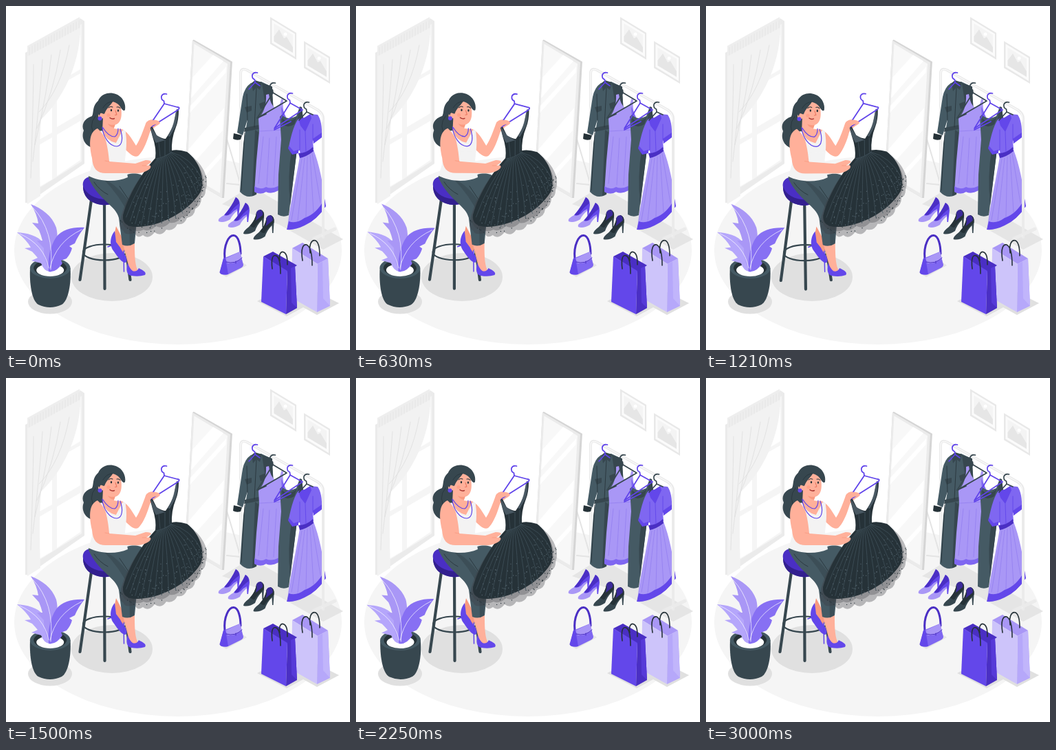
Recreate the animation shown at these times as an HTML page. Size 500 by 500 pixels, loop 3.04 s.

```html
<!DOCTYPE html>
<html lang="en">
<head>
<meta charset="utf-8">
<title>Choosing a dress</title>
<style>
html,body{margin:0;width:100%;height:100%;overflow:hidden;background:#fff}
svg{display:block;width:100vw;height:100vh}
.ln{fill:none;stroke-linecap:round;stroke-linejoin:round}
.skin{fill:#ffb09a}
.night{fill:#263238}.slate{fill:#37474f}.steel{fill:#455a64}
.deep{fill:#4a2fc4}.violet{fill:#6347ea}.mid{fill:#7f67f1}.lilac{fill:#a997f6}.pale{fill:#cdc4fa}
</style>
</head>
<body>
<svg viewBox="0 0 500 500">
<defs>
  <path id="hook" class="ln" d="M0,0L-.5,-4Q-5,-6 -4,-11Q-2,-15.500 3.500,-14"/>
  <g id="picture">
    <path fill="#e8e8e8" d="M0,0L38,23V62L0,39Z"/>
    <path fill="#fbfbfb" d="M2.500,4L36,24.500V58L2.500,37.500Z"/>
    <path fill="#f4f4f4" d="M5.500,9.500L33,26V52L5.500,35.500Z"/>
    <path fill="#e6e6e6" d="M5.500,35.500V28L13,18L20,31L24,29L33,44V52Z"/>
    <circle cx="22" cy="25" r="2.500" fill="#fff"/>
  </g>
</defs>

<ellipse cx="250" cy="355" rx="238" ry="137" fill="#f5f5f5"/>

<!-- window and curtain -->
<path fill="#ebebeb" d="M28,68L108,18L114,22V229L32,286H28Z"/>
<path fill="#f5f5f5" d="M33,72L110,26V226L33,274Z"/>
<path fill="#fff" d="M36,84L67,66V184L36,201ZM74,62L108,42V92L74,112ZM74,117L108,98V156L74,176ZM36,209L67,191V252L36,270ZM74,187L108,167V224L74,247Z"/>
<path fill="#f2f2f2" d="M31,70L108,28C109,75 88,130 51,165C48,200 49,240 50,276L31,288Z"/>
<path fill="#eee" d="M31,58L107,16L108,31L31,73Z"/>
<g id="folds" class="ln" stroke="#e2e2e2"/>

<use href="#picture" x="384" y="16"/>
<use href="#picture" x="433" y="51"/>

<!-- floor shadow of the rack and mirror -->
<path fill="#e5e5e5" d="M314,288L356,262L490,339L461,354L398,318L356,302Z"/>

<!-- mirror -->
<path class="ln" stroke="#e4e4e4" stroke-width="2" d="M320,190L341,260M321,258L341,260"/>
<path fill="#d5d5d5" d="M271,50L273,49L329,81L317,279L314,279L260,247Z"/>
<path fill="#ebebeb" d="M271,50L326,82L314,279L260,247Z"/>
<path fill="#f8f8f8" d="M273.500,55L322,84L311,272L263,244Z"/>
<path fill="#fff" d="M271,104L301,71L316,80L269,134ZM268,145L320,88L319.500,97L267.500,155ZM265.500,208L317,148L315,181L264,238ZM276,252L314,211L313.500,220L282,255Z"/>

<!-- rack -->
<g class="ln" stroke="#ebebeb" stroke-width="4">
  <path d="M341,272V97Q342,89 350,93L453,151Q461,156 461,164V336"/>
  <path stroke-width="5" d="M448,338L478,324"/>
</g>
<path class="ln" stroke="#fff" d="M341,270V97Q342,90 350,93L453,151Q460,156 460,164V334"/>

<!-- shirt dress -->
<path class="steel" d="M356,112Q347,118 344,132L336,184L344,188L351,165L345,200L340,270Q350,281 362,275L377,200L389,150L386,117L371,110Z"/>
<path class="slate" d="M357,112L362,108L372,111L369,122L364,118L359,124ZM372,112L387,117L388,148L380,165ZM347,177L372,172L371,178L346,183ZM347,147L357,145V152L350,155ZM368,142L378,138V146L370,150ZM362,180L358,276L364,274L377,190Z"/>
<path class="night" d="M331,185L343,188L341,194Q335,196 330,193Z"/>
<path class="ln" stroke="#263238" stroke-width=".8" d="M364,119L361,176M350,128L351,166M347,184L342,268"/>
<use href="#hook" x="362" y="111" stroke="#5f43ea" stroke-width="1.800"/>
<path class="ln" stroke="#5f43ea" stroke-width="1.600" d="M353,121L362,111L369,116"/>

<!-- slip dress -->
<path class="lilac" d="M378,129L382,128Q384,143 391,148Q399,146 400,135L403,136Q401,153 408,164L404,190L396,268Q385,274 378,270Q370,275 361,270L364,225L368,182L367,164Q379,150 378,129Z"/>
<path class="mid" d="M361,262Q370,268 378,263Q386,267 397,261L396,268Q385,274 378,270Q370,275 361,270ZM400,146L408,164L402,182Z"/>
<path class="ln" stroke="#947ff0" stroke-width=".8" d="M369,182L402,180M374,190L367,258M383,192L379,260M393,190L389,260"/>
<g class="ln" stroke="#37474f" stroke-width="1.700">
  <use href="#hook" x="388" y="126"/>
  <path d="M365,163L388,126L408,138ZM365,163L378,157"/>
</g>

<!-- long dark dress -->
<path class="steel" d="M398,161L401,158Q409,167 422,160L427,146L430,147L432,165L424,200L411,304Q403,308 395,303L396,245L400,194Z"/>
<path class="slate" d="M427,147L430,147L432,165L424,200L413,290Q409,245 415,210ZM401,163Q410,172 423,161L419,172Q409,178 402,172Z"/>
<g class="ln" stroke="#5f43ea" stroke-width="1.700">
  <use href="#hook" x="413" y="141"/>
  <path d="M390,178L413,141L431,151ZM390,180L414,168"/>
</g>

<!-- belted dress -->
<path class="lilac" d="M427,219L447,209C455,230 461,255 464,290Q452,311 434,318Q420,325 409,324C411,300 419,265 427,219Z"/>
<path class="violet" d="M411,313Q422,317 434,308Q452,302 463,280L465,291Q452,311 434,319Q420,326 408,325Z"/>
<path class="mid" d="M425,164Q417,174 411,205L417,213L427,210L428,217L447,208L446,196L459,190Q460,168 453,158L442,157L434,174Z"/>
<path class="deep" d="M425,214Q437,214 446,205L447,211Q437,219 427,221Z"/>
<path class="violet" d="M425,164L434,162L442,157L444,163L435,183L428,174ZM411,203L418,211L425,209L425,214L416,216L410,207ZM446,193L459,184L459,191L447,200Z"/>
<path class="ln" stroke="#947ff0" stroke-width=".8" d="M430,222L415,311M434,221L424,312M438,219L436,307M442,217L447,300M445,214L457,286"/>
<path class="ln" stroke="#5f43ea" stroke-width=".8" d="M435,183L436,212M427,180L427,209M446,172V194"/>
<g class="ln" stroke="#37474f" stroke-width="1.700">
  <use href="#hook" x="437" y="154"/>
  <path d="M426,166L437,154L446,158"/>
</g>
<path class="ln" stroke="#ebebeb" stroke-width="4" d="M461,170V332"/>

<!-- shoes -->
<g id="heels">
  <path class="lilac" d="M326,292Q331,287 336,289L338,296Q329,303 326,310Q316,316 309,313Q307,309 317,304Q322,299 326,292Z"/>
  <path class="violet" d="M334,278Q340,281 340,289L338,306H336.500L336,295Q331,297 327,302Q321,306 317,304Q327,293 334,278Z"/>
  <path class="deep" d="M334,278Q339,281 339,287Q330,293 324,303Q320,305 318,303Q328,292 334,278Z"/>
</g>
<use href="#heels" x="14" y="8"/>
<g id="pumps">
  <path class="slate" d="M370,296Q376,298 375,307L374,322H372.500L372,311Q365,318 362,327Q353,333 345,331Q345,327 353,321Q363,311 364,300Z"/>
  <path class="night" d="M370,296Q376,298 375,307Q366,314 361,322Q357,322 355,319Q363,310 364,300Z"/>
  <path fill="#3b2a9a" d="M364,300Q366,295 371,296.500Q374,299 373,304L363,312Q365,306 364,300Z"/>
</g>
<use href="#pumps" x="14.500" y="8"/>

<!-- handbag -->
<path fill="#e5e5e5" d="M309,387L340,370L350,377L320,394Z"/>
<path class="ln" stroke="#4a2fc4" stroke-width="3" d="M318,367C316,347 324,333 331,333.500C338,334 341,348 341,360"/>
<path class="mid" d="M316,367L340,357L345,376Q345,379 341,381L323,390Q313,392 311,387Z"/>
<path class="lilac" d="M319,367L340,357L343,367Q334,375 322,374Z"/>
<path class="violet" d="M316,367L319,366L323,390Q312,392 310.500,387Z"/>
<path class="ln" stroke="#4a2fc4" d="M320,372Q333,376 343,366M334,371V374"/>

<!-- shopping bags -->
<path fill="#e0e0e0" d="M365,429L420,400L484,432L452,449L432,438L408,451Z"/>
<path class="lilac" d="M416,352L431,344L468,367L453,375Z"/>
<path class="pale" d="M416,352L453,375L452,445L415,424Z"/>
<path fill="#b6a8fa" d="M453,375L468,367L471,436L452,445Z"/>
<path fill="#c1b5fb" d="M460,371L468,367L471,436L461,425Z"/>
<path class="ln" stroke="#263238" stroke-width="1.600" d="M431,370C428,352 432,346 437,347C443,350 445,363 445,377M442,359C440,345 445,339 450,341C455,344 456,353 456,363"/>
<path class="deep" d="M374,364L388,357L423,377L409,386Z"/>
<path class="violet" d="M374,364L409,385L407,448L371,430Z"/>
<path class="deep" d="M409,385L420,378L423,439L407,448Z"/>
<path fill="#563ad8" d="M414,381L420,378L423,439L415,431Z"/>
<path class="ln" stroke="#263238" stroke-width="1.600" d="M387,382C385,366 388,361 393,363C398,366 399,377 399,389M398,370C396,360 400,356 404,358C409,361 409,369 409,376"/>

<ellipse cx="64" cy="430" rx="32" ry="17.500" fill="#e0e0e0"/>
<ellipse cx="154" cy="394" rx="59" ry="35" fill="#e0e0e0"/>

<g id="plant">
  <path class="slate" d="M35,381C34,402 37,428 47,434Q64,442 81,434C91,428 95,402 93.500,381Z"/>
  <ellipse cx="64.200" cy="381" rx="29.400" ry="15" class="steel"/>
  <ellipse cx="64.200" cy="381" rx="24" ry="12" class="night"/>
  <ellipse cx="64.200" cy="384" rx="20" ry="9" fill="#fff"/>
  <path fill="#b5a6fb" d="M16,329C30,330 46,333 55,345C62,355 66,372 63,386Q55,385 51,374L37,370L46,366Q41,360 38,357L27,352L36,351Q30,340 16,329Z"/>
  <path class="lilac" d="M36,288C52,294 67,305 73,322C78,342 71,368 65,387C58,377 55,363 55,352L45,341L53,341Q51,333 48,326L38,315L47,316Q45,302 36,288Z"/>
  <path fill="#8770f3" d="M114,322C98,321 81,325 73,336C64,349 60,370 62,386Q73,388 82,374L80,370L88,367Q94,360 96,352L92,349L100,345Q105,333 114,322Z"/>
  <path class="ln" stroke="#fff" stroke-width=".8" opacity=".85" d="M20,331Q56,347 62,381M39,293Q71,327 65,383M110,325Q72,343 64,381"/>
</g>

<g id="woman">
  <!-- stool -->
  <g class="ln" stroke="#37474f" stroke-width="4.200">
    <path d="M124,282L107.500,398M143,286L143.500,411M165,284L180.500,398"/>
    <ellipse cx="143" cy="358" rx="31" ry="11.500" stroke-width="2.200"/>
  </g>
  <path class="deep" d="M112,262C110,248 124,246 140,247C160,248 170,256 170,268C168,283 152,291 139,289C124,287 112,277 112,262Z"/>
  <path fill="#33208f" d="M112,262C118,277 136,285 165,279Q155,291 139,289C124,287 112,279 112,262Z"/>

  <!-- legs -->
  <path fill="#f99a80" d="M160,320L173,345L171,362L162,352L157,334Z"/>
  <path class="violet" d="M158,327C152,334 149,347 157,357C163,366 171,376 175,372C178,364 169,359 166,351L160,343Q159,334 158,327Z"/>
  <path class="ln" stroke="#5f43ea" stroke-width="1.500" d="M156,347L148,350M171,356L171.500,386"/>
  <path class="skin" d="M170,343L187,343C187,360 187,374 191,383Q194,388 187,388L178,383C178,370 172,360 170,343Z"/>
  <path class="violet" d="M177,373C174,382 175,391 182,392Q193,394 202,391C205,387 199,384 193,381Q190,387 184,385Q179,381 177,373Z"/>
  <path class="steel" d="M120,247C138,254 160,250 176,245C194,240 208,248 205,263C202,276 196,282 192,292L187,345Q178,351 169,347L164,308C160,290 134,282 120,250Z"/>
  <path class="slate" d="M140,250Q165,262 180,287L188,303L186,345L180,348L179,305Q166,276 140,250Z" opacity=".6"/>
  <path class="ln" stroke="#263238" stroke-width=".8" d="M165,262L184,290M128,256Q136,268 148,274"/>

  <!-- head and torso -->
  <path class="slate" d="M134,138C125,145 128,155 125,160C113,164 109,173 113,181C109,191 114,203 126,206Q135,207 140,201L147,175L148,145Z"/>
  <path class="skin" d="M165,178C176,180 182,192 189,203C195,194 199,182 203,171C206,164 216,164 223,168C226,172 219,173 215,177Q209,181 208,187C204,200 198,213 192,218C186,221 179,214 173,208Z"/>
  <path fill="#f3f3f3" d="M134,182L173,181C177,195 174,215 173,224L177,249C160,257 135,255 120,247L125,230Z"/>
  <path class="skin" d="M141,162L158,170L157,178L170,180L160,199Q146,196 140,182Z"/>
  <path fill="#f3f3f3" d="M139,181Q147,202 160,199L170,180L174,183L173,212H140L132,184Z"/>
  <path fill="#f99a80" d="M147,168L159,172L157,177Q149,176 147,168Z"/>
  <path class="skin" d="M142,148C148,136 160,136 167,147C169,158 168,170 159,172.500C151,174 143,170 141,163Q134,166 134,159Q136,153 142,157Z"/>
  <path class="slate" d="M133,153C129,136 141,124 156,127C168,129 175,141 173,151Q171,154 167,148C164,142 159,140 155,139C152,145 146,148 143,157Q137,152 136,160Z"/>
  <path class="ln" stroke="#263238" stroke-width=".7" d="M155,139Q146,139 141,148M130,160Q118,174 131,192"/>
  <circle cx="136.500" cy="163.500" r="3" class="violet"/>
  <g class="night"><ellipse cx="153" cy="151.500" rx="1.200" ry="1.800"/><ellipse cx="163" cy="152" rx="1.200" ry="1.800"/></g>
  <g class="ln" stroke="#263238">
    <path d="M149,148Q152,145 155,147M161,147Q164,146 166,148.500"/>
    <path stroke="#e8735c" d="M159,152L161,158L158.500,158.500"/>
    <path stroke="#a8342f" stroke-width="1.400" d="M151,162.500Q154,165 157.500,163.500"/>
  </g>
  <circle cx="149" cy="158.500" r="2.600" fill="#ff8c72" opacity=".4"/>
  <path class="ln" stroke="#5f43ea" stroke-width="1.200" d="M140,176C141,191 151,204 161,204C170,203 170,190 166,179M141,177Q149,190 158,190Q163,187 163,178"/>

  <!-- hanger and dress -->
  <path fill="#3c3c40" opacity=".34" d="M241,211C262,206 281,225 288,240Q295,254 290,268Q290,277 284,279Q284,290 275,295Q274,306 263,308Q259,319 249,317Q244,328 233,325Q226,336 216,329Q207,340 199,333Q191,339 187,330Q172,334 171,327Q163,322 166,312C172,280 198,240 219,222Z"/>
  <path fill="#3c3c40" opacity=".3" d="M241,211C264,207 281,228 286,246Q288,258 285,270Q282,278 280,284Q276,295 269,297Q264,307 255,307Q248,317 238,315Q228,325 218,320Q208,329 200,325Q190,330 184,324Q170,326 169,311C174,280 198,240 219,222Z"/>
  <path class="night" d="M218,220C203,236 180,268 170,304C169,316 176,321 190,321C222,321 264,301 283,270C290,251 281,225 263,212Q250,208 241,210Z"/>
  <g id="pleats" class="ln" stroke="#3d4d56" stroke-width=".9"/>
  <g id="dots"/>
  <path class="night" d="M209,175L212,174L219,188Q227,193 232,193Q241,180 244,170L248,150L251,151Q251,166 247,176Q240,193 241,212Q230,222 217,222Q219,207 213,190Z"/>
  <path fill="#546570" opacity=".75" d="M210,175L219,188Q226,193 231,195L218,199L213,190ZM247,153L249,153Q250,166 246,176L238,190L235,189Q243,178 247,153Z"/>
  <path class="ln" stroke="#3d4d56" d="M222,198L224,219M231,195L231,217M238,192L238,212M218,222Q231,220 241,212"/>
  <g class="ln" stroke="#5f43ea" stroke-width="1.800">
    <use href="#hook" x="230" y="142"/>
    <path d="M230,142L209,173Q207,177 212,175L250,151Q254,147 249,147Z"/>
  </g>
  <path class="skin" d="M204,169Q212,163 223,168Q226,171 218,172Q212,173 209,178L203,176Z"/>

  <path class="skin" d="M133,178C121,183 120,199 125,221C126,236 132,243 145,243L186,243C196,244 207,240 210,235Q212,230 204,232L211,227Q211,224 203,224L188,229L150,226C149,214 147,201 144,192Q139,183 133,178Z"/>
  <path class="ln" stroke="#f99a80" stroke-width=".8" d="M150,226L144,225M198,232L204,232"/>
</g>
</svg>

<script>
const $ = id => document.getElementById(id);
const mix = (a, b, k) => a + (b - a) * k;
let seed = 7;
const rand = () => (seed = seed * 16807 % 2147483647) / 2147483647;

// hem of the skirt, a cubic from left to right
const cubic = (a, b, c, d, u) => {
  const v = 1 - u;
  return a*v*v*v + 3*b*v*v*u + 3*c*v*u*u + d*u*u*u;
};
const hem = u => [cubic(168, 190, 290, 288, u), cubic(310, 350, 315, 245, u)];

let pleats = '';
for (let i = 0; i < 15; i++) {
  const u = (i + .5) / 15, [x, y] = hem(u);
  const wx = mix(220, 240, u), wy = mix(222, 212, u);
  const ex = mix(230, x, .93), ey = mix(217, y, .93);
  pleats += `<path d="M${wx},${wy}Q${mix(wx, ex, .5) + (u - .4) * 12},${mix(wy, ey, .4) - u * 8} ${ex},${ey}"/>`;
}
$('pleats').innerHTML = pleats;

let dots = '';
for (let i = 0; i < 170; i++) {
  const [x, y] = hem(rand()), r = mix(.4, 1.05, Math.sqrt(rand()));
  dots += `<circle cx="${mix(230, x, r)}" cy="${mix(217, y, r)}" r=".7" fill="${r > .95 ? '#263238' : '#55656e'}"/>`;
}
$('dots').innerHTML = dots;

let folds = '';
for (let x = 34; x < 108; x += 4) {
  const y = 73 - (x - 31) * .545;
  folds += `<path stroke-width=".8" d="M${x},${y}v-11"/>`;
}
for (let i = 0; i < 5; i++) {
  folds += `<path d="M${40 + i * 13},${85 - i * 7}Q${40 + i * 10},${130 - i * 2} ${36 + i * 3},${250 - i * 24}"/>`;
}
$('folds').innerHTML = folds;

// linear sway: 0, +1, 0, -1, 0
const sway = p => p < .25 ? p * 4 : p < .75 ? 2 - p * 4 : p * 4 - 4;
const start = performance.now();

function draw(now) {
  const t = Math.min(Math.max(now - start, 0) % 3040, 3000);
  $('plant').setAttribute('transform', `rotate(${sway(t / 3000)} 65 363)`);
  $('woman').setAttribute('transform', `rotate(${.75 * sway(t / 1500 % 1)} 202 269)`);
  requestAnimationFrame(draw);
}
draw(start);
</script>
</body>
</html>
```
